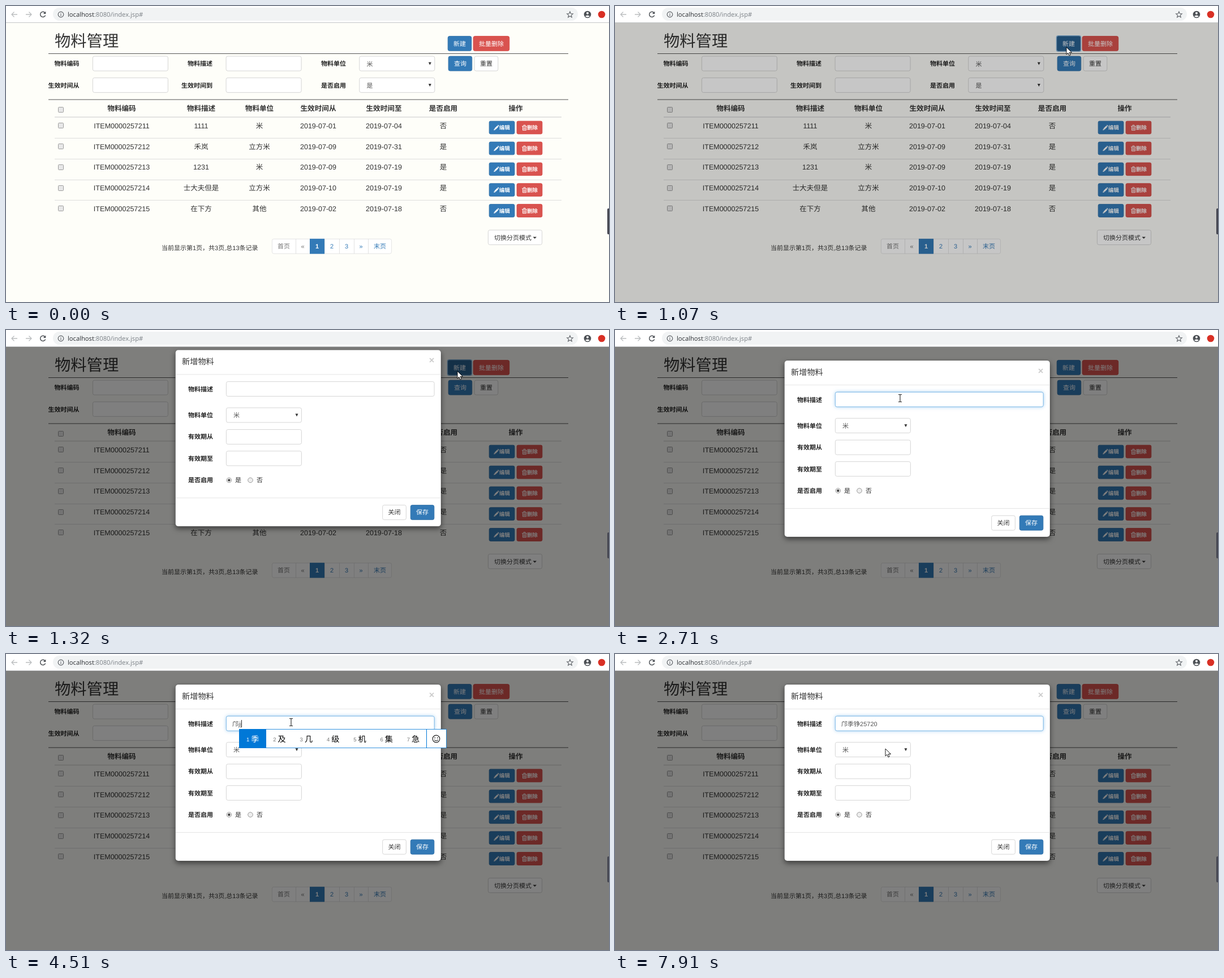
Write an HTML page that moves like this. It is 1066 px wide and 525 px high and loops after 8 s.

```html
<!DOCTYPE html>
<html>
<head>
<meta charset="utf-8">
<style>
  html, body { margin: 0; width: 100%; height: 100%; overflow: hidden; background: #fefef9; }
  svg { display: block; font-family: 'Liberation Sans', Arial, 'Noto Sans CJK SC', 'Noto Sans CJK', sans-serif; text-rendering: geometricPrecision; }
  .modal { filter: drop-shadow(0 4px 5px rgba(0,0,0,.5)); }
  .focused { filter: drop-shadow(0 0 3px rgba(102,175,233,.6)); }
</style>
</head>
<body>
<svg width="1066" height="525" viewBox="0 0 1066 525"></svg>
<script>
const LOOP = 8000;
const COLORS = {
  blue: ['#337ab7', '#2e6da4', '#fff'],
  dark: ['#286090', '#204d74', '#fff'],
  red: ['#d9534f', '#d43f3a', '#fff'],
  plain: ['#fff', '#ccc', '#333']
};
const CONTROL = 26.8; // height of inputs and buttons
const SMALL = 23.6;   // height of row buttons

// Markup helpers
const el = (tag, attrs, body = '') =>
  `<${tag} ${Object.entries(attrs).map(([k, v]) => `${k}="${v}"`).join(' ')}>${body}</${tag}>`;
const rect = (x, y, width, height, fill, more = {}) => el('rect', { x, y, width, height, fill, ...more });
const circle = (cx, cy, r, fill, more = {}) => el('circle', { cx, cy, r, fill, ...more });
const path = (d, stroke, width = 1, fill = 'none') => el('path', { d, stroke, 'stroke-width': width, fill });
const text = (s, x, cy, size = 11, fill = '#333', anchor = 'middle', weight = 400) =>
  el('text', { x, y: Math.round(cy + size * .38), 'font-size': size, fill, 'text-anchor': anchor, 'font-weight': weight }, s);
const label = (s, x, cy) => text(s, x, cy, 11, '#222', 'end', 700);
const box = (x, y, w, h, fill = '#fff', stroke = '#ccc', rx = 3) =>
  rect(x + .4, y + .4, w - .8, h - .8, fill, { stroke, 'stroke-width': .8, rx });
const field = (x, y, w = 133.8) => box(x, y, w, CONTROL);
const select = (x, y, value) => field(x, y) + text(value, x + 13, y + 13.8, 11, '#555', 'start') +
  path(`M${x + 122.5} ${y + 11}h5l-2.5 5z`, 'none', 0, '#333');
const button = (x, y, w, s, kind) => {
  const [fill, stroke, ink] = COLORS[kind];
  return box(x, y, w, CONTROL, fill, stroke) +
    text(s, x + w / 2, y + CONTROL / 2, 11, ink, 'middle', kind === 'plain' ? 400 : 500);
};
const checkbox = cy => rect(92.5, cy - 4.5, 9, 9, '#e8e8e8', { stroke: '#9c9c9c', rx: 1 });

function toolbar() {
  return rect(0, 0, 1066, 29, '#fff') + rect(0, 29, 1066, 1, '#c4c6c8') +
    rect(83, 3, 928, 23, '#f1f3f4', { rx: 11.5 }) +
    path('M20 15H10M14.5 10.5L10 15l4.5 4.5M35 15h10M40.5 10.5L45 15l-4.5 4.5', '#bbbdbf', 1.3) +
    path('M69 12.2A4.6 4.6 0 1 0 69.6 16.5', '#4d5156', 1.5) + path('M70.3 9.5v4.5h-4.5z', 'none', 0, '#4d5156') +
    circle(97, 15, 4.8, 'none', { stroke: '#5f6368', 'stroke-width': 1.2 }) + path('M97 14.5v3.2M97 12.2v1.2', '#5f6368', 1.2) +
    el('text', { x: 109, y: 19, 'font-size': 11.2, fill: '#2b2e32', 'font-family': "'Open Sans', sans-serif" },
      'localhost<tspan fill="#7b8086">:8080/index.jsp#</tspan>') +
    path('M997 10l1.5 3.5 3.8.3-2.9 2.5.9 3.7-3.3-2-3.3 2 .9-3.7-2.9-2.5 3.8-.3z', '#5f6368', 1.1) +
    circle(1028, 15, 6.3, '#4d5156') + circle(1028, 12.8, 2, '#fff') + path('M1024 18.2q4-3.6 8 0q-4 3-8 0z', 'none', 0, '#fff') +
    circle(1053, 15, 6.3, '#d93025');
}

function rowButtons(y) {
  const small = (x, s, textX, [fill, stroke]) => box(x, y, 45.6, SMALL, fill, stroke, 2.4) +
    text(s, textX, y + SMALL / 2, 9.45, '#fff', 'start', 700);
  const pencil = path('M864.5 14.500l5-5M870 9l1-1', '#fff', 2.8) + path('M862.3 16.700l.8-3 2.2 2.2z', 'none', 0, '#fff');
  const bin = path('M912 9.500h9M915 9v-1.500h3v1.500M913.500 10v6.500h6v-6.500M915.500 11v4.500M917.500 11v4.500', '#fff');
  return small(853.8, '编辑', 872, COLORS.blue) + small(902.7, '删除', 921, COLORS.red) +
    el('g', { transform: `translate(0 ${y})` }, pencil + bin);
}

function table() {
  const columns = [204.5, 345, 448, 552, 668, 773, 901];
  const heads = ['物料编码', '物料描述', '物料单位', '生效时间从', '生效时间至', '是否启用', '操作'];
  const rows = [
    ['1111', '米', '01', '04', '否'],
    ['禾岚', '立方米', '09', '31', '是'],
    ['1231', '米', '09', '19', '是'],
    ['士大夫但是', '立方米', '10', '19', '是'],
    ['在下方', '其他', '02', '18', '否']
  ];
  let out = checkbox(184) + heads.map((s, i) => text(s, columns[i], 181, 12.6, '#333', 'middle', 700)).join('');
  rows.forEach(([name, unit, from, to, used], i) => {
    const cy = 212 + 36.85 * i;
    const cells = ['ITEM000025721' + (i + 1), name, unit, '2019-07-' + from, '2019-07-' + to, used];
    out += (i ? rect(86, Math.round(cy - 15), 896, 1, '#ddd') : rect(86, 196.2, 896, 1.6, '#ddd')) +
      checkbox(Math.round(cy)) + cells.map((s, c) => text(s, columns[c], cy, 12.5)).join('') + rowButtons(cy - 8.2);
  });
  return out;
}

function pager() {
  const edges = [470, 512, 537, 563, 589, 615, 640, 682];
  return text('当前显示第1页，共3页,总13条记录', 275, 428.5, 11, '#333', 'start') +
    box(470, 412.8, 212, CONTROL, '#fff', '#ddd') +
    ['首页', '«', '1', '2', '3', '»', '末页'].map((s, i) => {
      const [a, b] = [edges[i], edges[i + 1]], active = i === 2;
      return (active ? rect(a, 412.8, b - a, CONTROL, '#337ab7') : i ? rect(a, 413, .8, 26.4, '#ddd') : '') +
        text(s, (a + b) / 2, 426, 11, active ? '#fff' : i < 2 ? '#777' : '#337ab7', 'middle', active ? 700 : 400);
    }).join('') +
    box(852, 397, 96, CONTROL) + text('切换分页模式', 863, 410.5, 11, '#333', 'start') + path('M931.5 409.5h6.5l-3.2 3.3z', 'none', 0, '#333');
}

function page() {
  return rect(0, 0, 1066, 525, '#fefef9') + text('物料管理', 86, 61, 28.3, '#333', 'start') +
    rect(75, 84, 919, 1, '#555') + rect(75, 165.5, 919, 1, '#555') +
    label('物料编码', 129.5, 102) + label('物料描述', 365, 102) + label('物料单位', 601, 102) +
    label('生效时间从', 129.5, 140.5) + label('生效时间到', 365, 140.5) + label('是否启用', 601, 140.5) +
    field(153, 88.7) + field(388.7, 88.7) + select(624.4, 88.7, '米') +
    field(153, 127) + field(388.7, 127) + select(624.4, 127, '是') +
    button(780.8, 53.2, 42.5, '新建', 'blue') +
    el('g', { id: 'lit' }, button(780.8, 53.2, 42.5, '新建', 'dark')) +
    rect(780.5, 52.8, 43, 27.6, 'none', { id: 'ring', rx: 3, stroke: '#8ab9e0', 'stroke-width': 1.5 }) +
    button(825.7, 53.2, 64.5, '批量删除', 'red') + button(781.7, 88.7, 42.5, '查询', 'blue') + button(827.7, 88.7, 42.5, '重置', 'plain') +
    table() + pager();
}

function modal() {
  const radio = x => circle(x, 285, 4.3, '#eee', { stroke: '#999' });
  return rect(299.5, 54, 469.5, 313, '#fff', { rx: 5, stroke: '#000', 'stroke-opacity': .25, class: 'modal' }) +
    text('新增物料', 311, 75, 14.2, '#333', 'start') + text('×', 752.5, 71.8, 16.5, '#ccc', 'middle', 700) +
    rect(300, 97, 469, 1, '#e5e5e5') + rect(300, 316, 469, 1, '#e5e5e5') +
    ['物料描述', '物料单位', '有效期从', '有效期至', '是否启用'].map((s, i) => label(s, 366, [123.5, 170, 208, 246.5, 285][i])).join('') +
    field(389, 109.8, 368.5) + select(389, 156.2, '米') + field(389, 194.8) + field(389, 233) +
    radio(394.3) + circle(394.3, 285, 2.2, '#444') + text('是', 405, 285, 11, '#333', 'start') +
    radio(432) + text('否', 443, 285, 11, '#333', 'start') +
    button(665.3, 328.8, 42.5, '关闭', 'plain') + button(714.8, 328.8, 42.5, '保存', 'blue');
}

const ids = 'lit ring shade dialog focus entry caret ime mouse arrow beam'.split(' ');
document.querySelector('svg').innerHTML = page() +
  rect(0, 30, 1066, 495, '#000', { id: 'shade' }) +
  el('g', { id: 'dialog' }, modal()) +
  el('g', { id: 'focus', class: 'focused' }, box(389, 109.8, 368.5, CONTROL, '#fff', '#66afe9')) +
  el('text', { id: 'entry', x: 400, y: 128, 'font-size': 11.02, fill: '#555' }) +
  rect(0, 117, 1, 13, '#333', { id: 'caret' }) +
  rect(1063, 359, 8, 46, '#464752', { rx: 2 }) + toolbar() + el('g', { id: 'ime' }) +
  el('g', { id: 'mouse' },
    el('g', { id: 'arrow' }, path('M0 0V13l3-2.700 2 4.700 2.200-1-2-4.500H9.500z', '#000', .9, '#fff')) +
    el('g', { id: 'beam' }, path('M-3-6.500h2.200l.800.800.800-.800h2.200M-3 6.500h2.200l.800-.800.800.800h2.200M0-6V6', '#222', 1.1)));
const ui = Object.fromEntries(ids.map(id => [id, document.getElementById(id)]));

// time, committed text, letters being composed, candidates
const typing = [
  [0, '', ''],
  [2940, '', 'k', '可看快开口课科'],
  [3250, '', 'ku', '苦哭库酷裤枯窟'],
  [3400, '', 'kua', '跨夸垮挎胯侉咵'],
  [3560, '', 'kuan', '宽款髋况狂矿框'],
  [3720, '', 'kuang', '邝况狂矿框旷筐'],
  [4190, '邝', ''],
  [4360, '邝', 'j', '就将及见几家加'],
  [4440, '邝', 'ji', '季及几级机集急'],
  [5060, '邝季', ''],
  [5200, '邝季', 'z', '在这中子自做再'],
  [5280, '邝季', 'zh', '这中只之着者种'],
  [5430, '邝季', 'zhe', '这着者折哲浙遮'],
  [5510, '邝季', 'zhen', '真镇阵针震珍振'],
  [5590, '邝季', 'zheng', '铮正整证争征政'],
  [5920, '邝季铮', ''],
  [6310, '邝季铮2', ''],
  [6600, '邝季铮25', ''],
  [6830, '邝季铮257', ''],
  [6920, '邝季铮2572', ''],
  [7070, '邝季铮25720', '']
];

// time, x, y of the pointer
const pointer = [
  [200, 996, 498], [480, 930, 330], [720, 820, 110], [850, 798, 73], [1480, 798, 73],
  [1730, 570, 124], [1990, 570, 124], [2300, 504, 121], [7580, 504, 121], [7870, 478, 168]
];

const clamp = v => Math.min(1, Math.max(0, v));
const show = (node, on) => node.setAttribute('visibility', on ? 'visible' : 'hidden');

function pointerAt(t) {
  const i = pointer.findIndex(p => p[0] > t);
  if (i < 0) return pointer.at(-1).slice(1);
  if (i === 0) return pointer[0].slice(1);
  const [a, b] = [pointer[i - 1], pointer[i]], k = (t - a[0]) / (b[0] - a[0]);
  return [1, 2].map(n => Math.round(a[n] + (b[n] - a[n]) * k));
}

function candidateBar(x, y, words) {
  const cx = x + 348.5, cy = y + 17.5;
  return box(x, y, 367, 34, '#fff', '#0078d7', 0) + rect(x, y, 48, 34, '#0078d7') + rect(x + 331, y, 1, 34, '#0078d7') +
    [...words].map((word, i) => {
      const left = x + 13 + 47.3 * i;
      return text(i + 1, left, cy + 1, 9.5, i ? '#767676' : '#fff', 'start') +
        text(word, left + 8.3, cy, 14.2, i ? '#000' : '#fff', 'start');
    }).join('') +
    circle(cx, cy, 6.3, 'none', { stroke: '#222', 'stroke-width': 1.2 }) +
    circle(cx - 2.3, cy - 1.8, .9, '#222') + circle(cx + 2.3, cy - 1.8, .9, '#222') +
    path(`M${cx - 3.3} ${cy + 1.5}q3.3 4 6.6 0`, '#222', 1.1);
}

let current;
function updateTyping(t) {
  const state = typing.findLast(s => t >= s[0]);
  if (state === current) return;
  current = state;
  const [, done, composing, words] = state;
  ui.entry.innerHTML = done + (composing && `<tspan text-decoration="underline">${composing}</tspan>`);
  const x = 400 + Math.round(done || composing ? ui.entry.getComputedTextLength() : 0);
  ui.caret.setAttribute('x', x);
  ui.ime.innerHTML = words ? candidateBar(x - 4, done ? 133 : 132, words) : '';
}

function draw(t) {
  // Pointer and dialog move in steps, like a screen recording
  const step = 1070 + Math.floor((t - 1070) / 83) * 83;
  const slide = clamp((step - 1147) / 300);
  ui.shade.setAttribute('opacity', .5 * clamp((step - 1003) / 150));
  ui.dialog.setAttribute('opacity', clamp((step - 1147) / 150));
  ui.dialog.setAttribute('transform', `translate(0 ${-78 * (1 - slide) ** 1.68})`);
  show(ui.lit, step >= 840 && step < 1480);
  show(ui.ring, step >= 980 && step < 1480);
  ui.focus.setAttribute('opacity', clamp((t - 2150) / 150));
  updateTyping(t);
  show(ui.caret, t >= 2170 && t < 7610 && !(t >= 2710 && t < 2940));

  const [x, y] = pointerAt(step);
  const overInput = t > 1480 && x > 389 && x < 758 && y > 109 && y < 137;
  ui.mouse.setAttribute('transform', `translate(${x} ${y})`);
  show(ui.arrow, t >= 200 && !overInput);
  show(ui.beam, overInput);
}

function tick() {
  draw(performance.now() % LOOP);
  requestAnimationFrame(tick);
}
tick();
</script>
</body>
</html>
```
